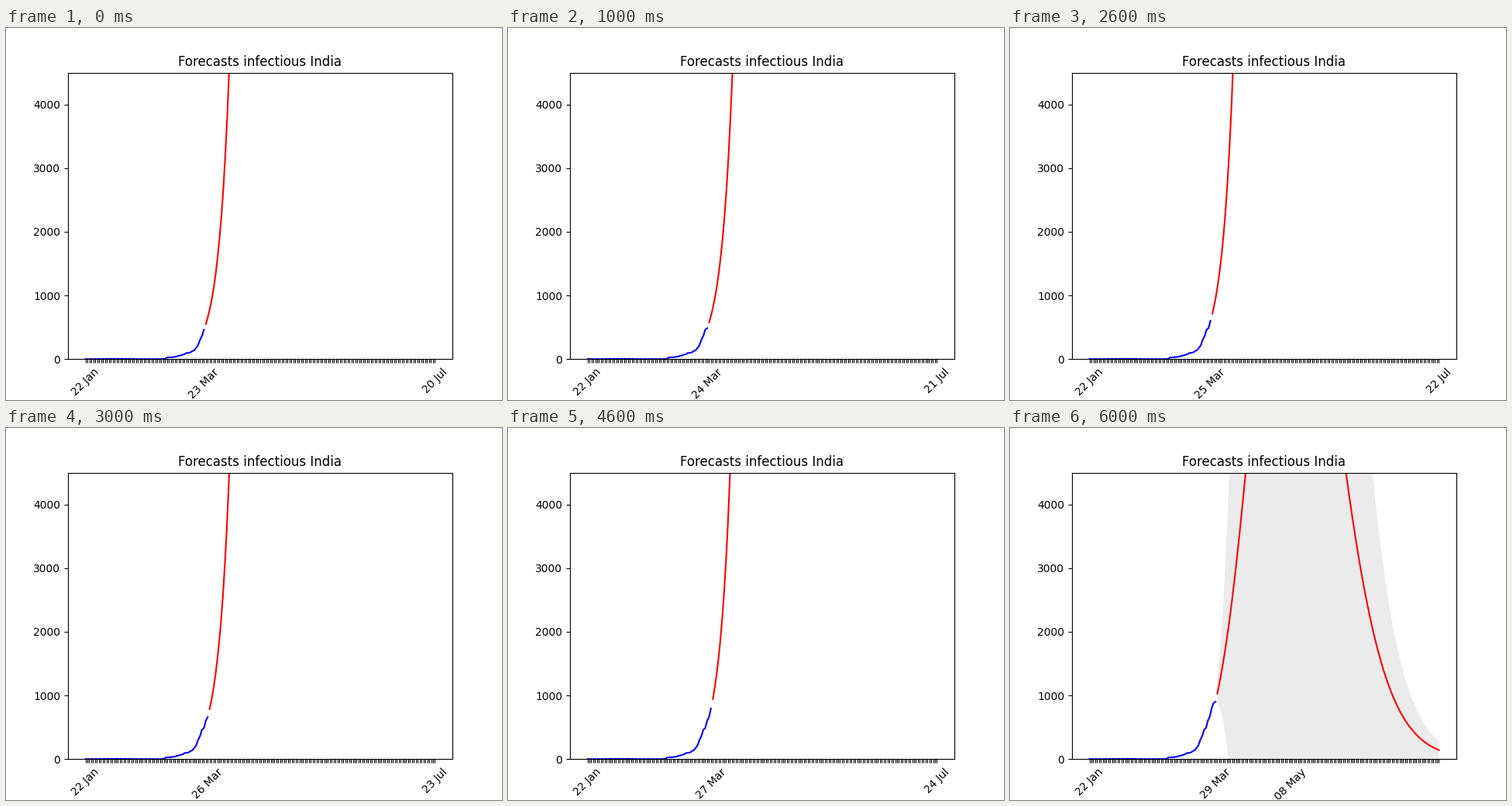
Animation of 640x480 px, one loop 7000 ms. Source, as a matplotlib script:

```python
import numpy as np
import matplotlib.pyplot as plt
from matplotlib.animation import FuncAnimation

FIRST_DAY = 61      # 23 Mar, counted from 22 Jan
HORIZON = 119       # forecast length in days
Y_MAX = 4500

MONTHS = [("Jan", 31), ("Feb", 29), ("Mar", 31), ("Apr", 30),
          ("May", 31), ("Jun", 30), ("Jul", 31)]

# Active cases per day from 22 Jan
CASES = np.array(
    [0] * 8 + [1] * 3 + [2] + [3] * 13 + [0] * 15 + [2, 2]
    + [25, 27, 28, 31, 36, 40, 52, 57, 68, 76, 96, 98, 104, 125, 139,
       175, 219, 303, 362, 462, 486, 602, 662, 794, 879, 902])

# Daily growth rate of each plain exponential forecast
RATES = [0.1755, 0.1703, 0.1722, 0.1699, 0.1721, 0.1585]

# Last forecast: transmission decays, recovery stays constant
BETA, DECAY, GAMMA = 0.24343, 0.02, 0.10838


def date_label(day):
    day += 22
    for name, length in MONTHS:
        if day <= length:
            return f"{day:02d} {name}"
        day -= length


def exponential(start, rate):
    t = np.arange(1, 21)
    return t, start * np.exp(rate * t)


def damped(start):
    t = np.arange(1, HORIZON + 1)
    growth = BETA * (1 - np.exp(-DECAY * t)) / DECAY - GAMMA * t
    return t, start * np.exp(growth)


def draw(step):
    ax.clear()
    today = FIRST_DAY + step
    last = today + HORIZON
    start = CASES[today]
    marks = [0, today, last]

    ax.plot(np.arange(today + 1), CASES[:today + 1], color="blue")
    if step < len(RATES):
        t, forecast = exponential(start, RATES[step])
    else:
        t, forecast = damped(start)
        spread = np.minimum(0.145 * t, 1.69 - 0.006 * t)
        ax.fill_between(today + t, forecast * (1 - spread),
                        forecast * (1 + spread), color="#ebebeb", lw=0)
        marks[2] = today + 40
    ax.plot(today + t, forecast, color="red")

    labels = [date_label(d) if d in marks else "" for d in range(last + 1)]
    ax.set_xticks(range(last + 1), labels, rotation=45)
    ax.set_yticks(range(0, Y_MAX, 1000))
    ax.set_xlim(-0.05 * last, 1.05 * last)
    ax.set_ylim(0, Y_MAX)
    ax.set_title("Forecasts infectious India")


fig, ax = plt.subplots(figsize=(6.4, 4.8), dpi=100)
anim = FuncAnimation(fig, draw, frames=len(RATES) + 1, interval=1000,
                     init_func=lambda: None, repeat=True, repeat_delay=0)
plt.show()
```
